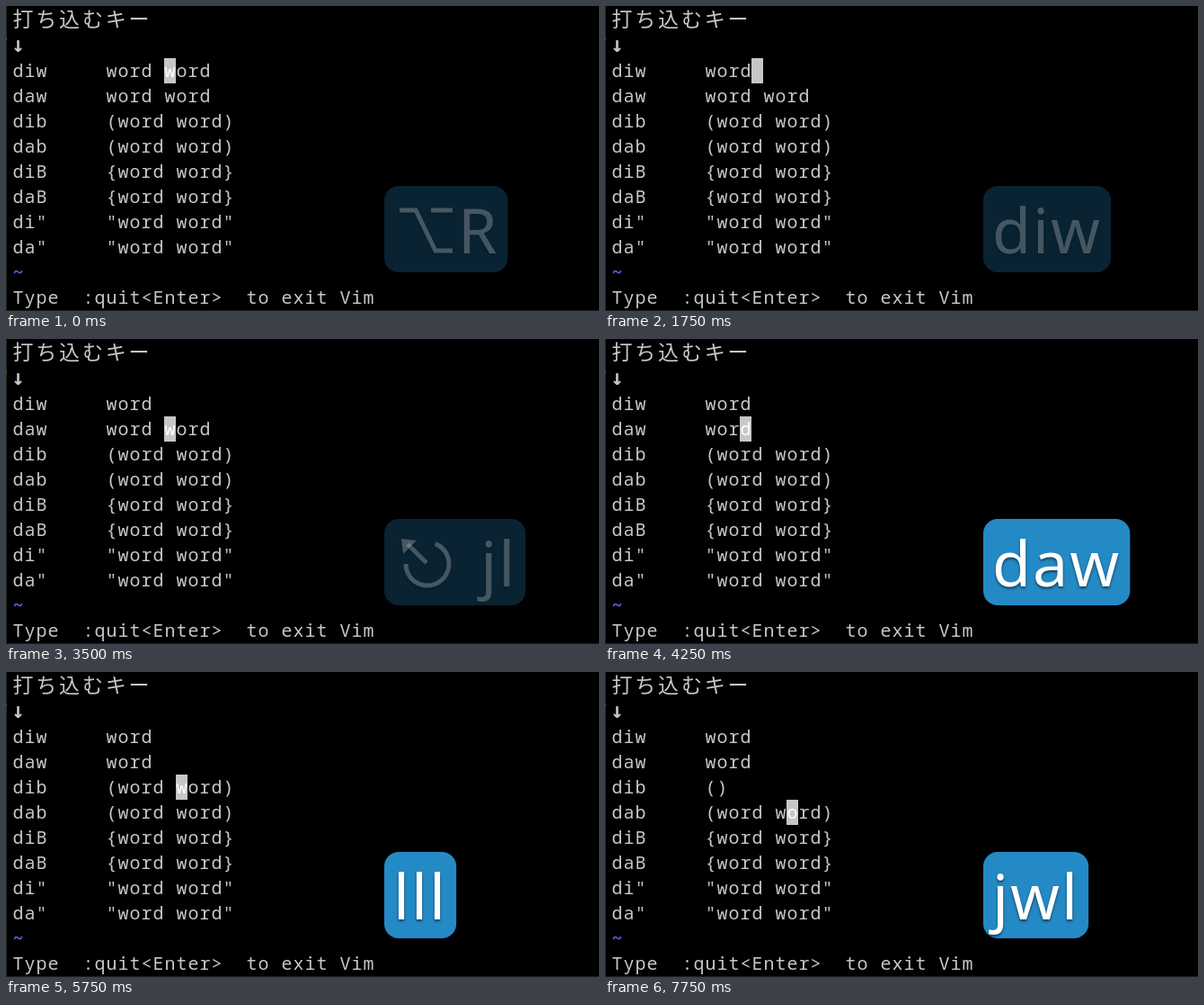
Write an HTML page with a canvas that moves like this. It is 660x339 px and loops after 8000 ms.

```html
<!DOCTYPE html>
<html lang="ja">
<head>
<meta charset="utf-8">
<style>
  html, body { margin: 0; height: 100%; overflow: hidden; background: #000; }
  canvas { display: block; }
</style>
</head>
<body>
<canvas id="stage" width="660" height="339"></canvas>
<script>
const ctx = document.getElementById('stage').getContext('2d');
const STEP = 250, STEPS = 32;
const LEFT = 7, TOP = 2, COL = 13, ROW = 28, BASE = 21;
const GREY = '#c7c7c7', WHITE = '#fff';
const MONO = '20px "Noto Sans Mono", monospace';

// Buffer rows: command, argument, and what the command leaves from a given step on
const buffer = [
  ['diw', 'word word', 4, 'word '],
  ['daw', 'word word', 17, 'word'],
  ['dib', '(word word)', 27, '()'],
  ['dab', '(word word)'],
  ['diB', '{word word}'],
  ['daB', '{word word}'],
  ['di"', '"word word"'],
  ['da"', '"word word"']
];

// Cursor: first step, row, column
const moves = [
  [0, 2, 13], [4, 2, 12], [9, 3, 12], [10, 3, 13], [17, 3, 11],
  [20, 4, 11], [22, 4, 13], [23, 4, 14], [27, 4, 9],
  [29, 5, 9], [30, 5, 14], [31, 5, 15]
];

// Key display: first step, keys, opacity
const keys = [
  [0, '⌥R', .25], [1, '', 0], [2, 'd', 1], [3, 'di', 1], [4, 'diw', 1],
  [6, 'diw', .6], [7, 'diw', .25], [8, '⎋', 1], [9, '⎋ j', 1], [10, '⎋ jl', 1],
  [13, '⎋ jl', .6], [14, '⎋ jl', .25], [15, 'd', 1], [16, 'da', 1], [17, 'daw', 1],
  [19, 'daw', .4], [20, 'j', 1], [22, 'll', 1], [23, 'lll', 1], [24, 'lll', .5],
  [25, 'd', 1], [26, 'di', 1], [27, 'dib', 1], [29, 'j', 1], [30, 'jw', 1], [31, 'jwl', 1]
];

const symbols = {
  '⌥': {
    advance: 72,
    draw: () => line([[438, 227], [456, 227], [478, 272], [497, 272]], [[473, 227], [497, 227]])
  },
  '⎋': {
    advance: 77,
    draw() {
      ctx.beginPath();
      ctx.arc(469, 250, 24, -1.2, Math.PI);
      ctx.stroke();
      line([[468, 249], [447, 228]]);
      ctx.beginPath();
      ctx.moveTo(440, 222);
      ctx.lineTo(457, 224);
      ctx.lineTo(442, 239);
      ctx.fill();
    }
  }
};

const current = (list, step) => list.findLast(item => item[0] <= step);

function line(...paths) {
  ctx.beginPath();
  for (const path of paths) path.forEach(([x, y], i) => i ? ctx.lineTo(x, y) : ctx.moveTo(x, y));
  ctx.stroke();
}

function setFont(font, spacing = 0) {
  ctx.font = font;
  ctx.letterSpacing = `${spacing}px`;
}

// Letter spacing that fills the terminal column
function setMono(weight) {
  setFont(`${weight} ${MONO}`);
  ctx.letterSpacing = `${COL - ctx.measureText('0').width}px`;
}

function write(text, row, col = 0, color = GREY) {
  ctx.fillStyle = color;
  ctx.fillText(text, LEFT + .5 + col * COL, TOP + row * ROW + BASE);
}

function drawTerminal(step) {
  ctx.fillStyle = '#000';
  ctx.fillRect(0, 0, 660, 339);
  ctx.fillStyle = '#242424';
  ctx.fillRect(0, 0, 1, 339);
  ctx.fillStyle = '#1c1a1c';
  ctx.fillRect(0, 338, 660, 1);
  ctx.fillStyle = '#3c5a1c';
  ctx.fillRect(0, 35, 1, 3);

  setFont('500 23px "Noto Sans CJK JP", sans-serif', 2.8);
  write('打ち込むキー', 0);
  setFont('bold 24px "DejaVu Sans Mono", monospace');
  write('↓', 1, -.1);

  setMono(500);
  const [, cursorRow, cursorCol] = current(moves, step);
  buffer.forEach(([command, before, doneAt, after], i) => {
    const row = i + 2, text = step >= doneAt ? after : before;
    write(command, row);
    write(text, row, 8);
    if (row === cursorRow) {
      ctx.fillStyle = GREY;
      ctx.fillRect(LEFT + cursorCol * COL, TOP + row * ROW, COL, ROW);
      write(text[cursorCol - 8], row, cursorCol, WHITE);
    }
  });
  write('Type  :quit<Enter>  to exit Vim', 11);
  setMono('bold');
  write('~', 10, 0, '#6464f4');
}

function drawKeys(step) {
  const [, label, alpha] = current(keys, step);
  if (!label) return;
  const symbol = symbols[label[0]];
  const text = symbol ? label.slice(1) : label;
  const indent = symbol ? symbol.advance : 0;
  ctx.save();
  ctx.globalAlpha = alpha;
  setFont('70px "Noto Sans", sans-serif', 2);
  ctx.fillStyle = '#248ac6';
  ctx.beginPath();
  ctx.roundRect(421, 200, 20 + indent + ctx.measureText(text).width, 96, 16);
  ctx.fill();
  ctx.fillStyle = ctx.strokeStyle = WHITE;
  ctx.lineWidth = 5;
  ctx.shadowColor = 'rgba(0, 0, 0, .55)';
  ctx.shadowOffsetY = 2;
  ctx.shadowBlur = 3;
  if (symbol) symbol.draw();
  ctx.fillText(text, 431 + indent, 274.5);
  ctx.restore();
}

function frame() {
  const step = Math.floor(performance.now() / STEP) % STEPS;
  drawTerminal(step);
  drawKeys(step);
  requestAnimationFrame(frame);
}
frame();
</script>
</body>
</html>
```
